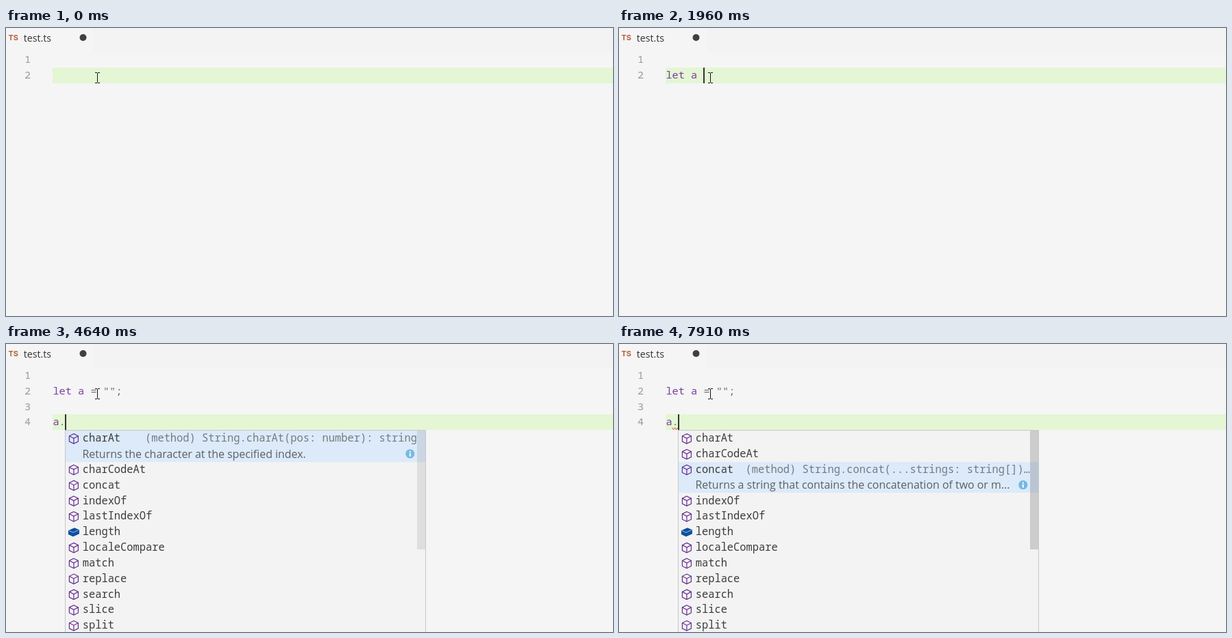
An HTML page with a canvas for the animation above (8 s loop, 886 px wide and 422 px high).

```html
<!DOCTYPE html>
<html lang="en">
<head>
<meta charset="utf-8">
<title>Editor completion</title>
<style>
  html, body { margin: 0; width: 100%; height: 100%; overflow: hidden; background: #f5f5f5; }
  canvas { display: block; }
</style>
</head>
<body>
<canvas id="stage" width="886" height="422"></canvas>
<script>
const ctx = document.getElementById('stage').getContext('2d');
const LOOP = 8000;
const MONO = '"Noto Sans Mono", "DejaVu Sans Mono", monospace';
const SANS = '"Open Sans", "Noto Sans", sans-serif';
const CODE_FONT = `15.3px ${MONO}`;
const LIST_SIZE = '15.4px';
const CODE_X = 68.4, CHAR_W = 9.18, ROW_H = 22.83;
const lineTop = n => Math.round(35.2 + (n - 1) * 22.75);

// [time, line, text on that line]
const edits = [
  [0, 2, ''], [1240, 2, 'l'], [1310, 2, 'le'], [1460, 2, 'let'], [1720, 2, 'let '],
  [1810, 2, 'let a'], [1960, 2, 'let a '], [2260, 2, 'let a ='], [2330, 2, 'let a = '],
  [2580, 2, 'let a = ""'], [3740, 2, 'let a = "";'], [3950, 3, ''], [4280, 4, ''],
  [4500, 4, 'a'], [4570, 4, 'a.']
];
const blinks = [470, 920, 1240, 3040, 3500, 4980, 5660, 6210, 6600, 7130, 7590];
const picks = [[4640, 0], [5580, 1], [6130, 2], [6530, 3], [7130, 2]];

const item = (icon, label) => ({ icon, label });
const requestTypes = [
  item('type', 'XMLHttpRequestEventTarget'), item('type', 'XMLHttpRequestEventTargetEventMap'),
  item('alias', 'XMLHttpRequestResponseType'), item('type', 'XMLHttpRequestUpload')
];
const lengthItem = item('field', 'length'), letItem = item('keyword', 'let');
const screenItem = item('field', 'screenLeft');
const globalsLe = [
  ...requestTypes, item('type', 'XMLSerializer'), item('type', 'XSLTProcessor'),
  item('method', 'addEventListener'), lengthItem, letItem, item('field', 'localStorage'),
  item('method', 'removeEventListener'), screenItem
];
const globalsLet = [
  ...['WebGLObject', 'WebGLRenderingContext', 'WebGLShaderPrecisionFormat', 'XMLDocument',
    'XMLHttpRequest'].map(name => item('type', name)),
  ...requestTypes, lengthItem, letItem, screenItem
];
const members = ['charAt', 'charCodeAt', 'concat', 'indexOf', 'lastIndexOf', 'length',
  'localeCompare', 'match', 'replace', 'search', 'slice', 'split']
  .map(name => item(name === 'length' ? 'field' : 'method', name));
const details = [
  ['(method) String.charAt(pos: number): string', 'Returns the character at the specified index.'],
  ['(method) String.charCodeAt(index: number…', 'Returns the Unicode value of the character at the specif...'],
  ['(method) String.concat(...strings: string[])…', 'Returns a string that contains the concatenation of two or m...'],
  ['(method) String.indexOf(searchString: strin…', 'Returns the position of the first occurrence of a substring.']
];

const latest = (steps, t) => steps.filter(step => step[0] <= t).pop();

function rect(x, y, w, h, color) {
  ctx.fillStyle = color;
  ctx.fillRect(x, y, w, h);
}

function text(str, x, y, color, font, align = 'left') {
  ctx.font = font;
  ctx.fillStyle = color;
  ctx.textAlign = align;
  ctx.fillText(str, x, y);
}

function disc(x, y, r, color) {
  ctx.fillStyle = color;
  ctx.beginPath();
  ctx.arc(x, y, r, 0, Math.PI * 2);
  ctx.fill();
}

function path(points, { stroke, fill, width = 1.2, close = false }) {
  ctx.beginPath();
  points.forEach(([x, y]) => ctx.lineTo(x, y));
  if (close) ctx.closePath();
  if (fill) { ctx.fillStyle = fill; ctx.fill(); }
  if (stroke) { ctx.strokeStyle = stroke; ctx.lineWidth = width; ctx.stroke(); }
}

// Icons are drawn around their own centre.
const icons = {
  type() {
    const blue = '#00539c';
    rect(-6, -0.8, 8, 1.6, blue);
    disc(-5.5, 0, 2.4, blue);
    disc(4, 0, 4, blue);
    disc(4, 0, 1.8, '#f3f3f3');
  },
  method() {
    const line = { stroke: '#652d90' };
    path([[0, -7.2], [6.5, -4], [6.5, 4], [0, 7.2], [-6.5, 4], [-6.5, -4]], { ...line, close: true });
    path([[-6.5, -4], [0, -0.6], [6.5, -4]], line);
    path([[0, -0.6], [0, 7.2]], line);
  },
  field() {
    path([[1, -6.5], [8, -3.5], [8, 2.5], [-1, 6.5], [-8, 3.2], [-8, -2.6]], { fill: '#0d51a0', close: true });
    path([[-7, -2.2], [-1, 0.4], [7, -3.1]], { stroke: '#c9d9ea', width: 0.8 });
  },
  alias() {
    const brown = '#8f7048';
    path([[-7.5, -3], [-3, -7], [1, -3], [-3.5, 1]], { fill: brown, close: true });
    path([[0, -2], [5, -2], [5, 1]], { stroke: brown });
    path([[-2, 0], [-2, 5], [2, 5]], { stroke: brown });
    path([[2, 1], [5, -1.5], [8, 1], [5, 3.5]], { fill: brown, close: true });
    path([[1, 5], [4, 2.5], [7, 5], [4, 7.5]], { fill: brown, close: true });
  },
  keyword() {
    [[-8, -6, 8], [2, -6, 5], [-8, -2, 4], [-2, -2, 9], [-8, 2, 9], [3, 2, 4], [-8, 6, 6], [0, 6, 7]]
      .forEach(([x, y, w]) => rect(x, y - 0.8, w, 1.6, '#686868'));
  }
};

// Positions of the letters that match the typed prefix, capitals first.
function matches(label, query) {
  const found = new Set();
  let from = 0;
  for (const ch of query) {
    let at = label.indexOf(ch.toUpperCase(), from);
    if (at < 0) at = label.indexOf(ch, from);
    if (at < 0) break;
    found.add(at);
    from = at + 1;
  }
  return found;
}

function drawLabel(label, x, y, query) {
  const hits = matches(label, query);
  ctx.font = `${LIST_SIZE} ${MONO}`;
  const step = ctx.measureText('0').width;
  [...label].forEach((ch, i) => hits.has(i)
    ? text(ch, x + i * step, y, '#0f66ab', `bold ${LIST_SIZE} ${MONO}`)
    : text(ch, x + i * step, y, '#3c3c3c', `${LIST_SIZE} ${MONO}`));
}

function drawPopup({ x, y, w, h, items, selected, detail, doc, query = '', thumb }) {
  rect(x, y, w, h, '#c8c8c8');
  rect(x + 1, y + 1, w - 2, h - 2, '#f3f3f3');
  let top = y + 1;
  items.forEach((entry, i) => {
    const active = i === selected;
    const height = active && doc ? ROW_H * 2 : ROW_H;
    if (active) {
      const begin = Math.round(top);
      rect(x + 1, begin, w - 2, Math.round(top + height) - begin, '#dceafa');
    }
    ctx.save();
    ctx.translate(x + 12.9, top + 11.8);
    icons[entry.icon]();
    ctx.restore();
    drawLabel(entry.label, x + 25.7, top + 16.2, query);
    if (active && detail) {
      text(detail, x + w - 13, top + 16.2, '#777b80', `${LIST_SIZE} ${MONO}`, 'right');
    }
    if (active && doc) {
      text(doc, x + 25.5, top + 39.5, '#5c6064', `15.92px ${SANS}`);
      const cx = x + w - 23.2, cy = top + 33.8;
      disc(cx, cy, 6.6, '#75b9e2');
      rect(cx - 1, cy - 4, 2, 2, '#fff');
      rect(cx - 1, cy - 1, 2, 5, '#fff');
    }
    top += height;
  });
  rect(x + w - 13, thumb.y, 12, thumb.h, `rgba(100, 100, 100, ${thumb.alpha})`);
}

function drawCompletion(t) {
  const globals = { y: 81, w: 528, h: 275, thumb: { y: 331, h: 24, alpha: 0.4 } };
  if (t >= 1390 && t < 1550) {
    drawPopup({ ...globals, x: 88, items: globalsLe, selected: 7, detail: 'var length: number', query: 'le' });
  } else if (t >= 1550 && t < 1720) {
    drawPopup({ ...globals, x: 95, items: globalsLet, selected: 10, query: 'let' });
  } else if (t >= 4640) {
    const selected = latest(picks, t)[1];
    const [detail, doc] = details[selected];
    const alpha = t < 4740 ? 0.15 : t < 7910 ? 0.4 : 0.28;
    drawPopup({ x: 86, y: 126, w: 527, h: 310, items: members, selected, detail, doc,
      thumb: { y: 127, h: 174, alpha } });
  }
}

function drawCode(t) {
  const [, current, typed] = latest(edits, t);
  rect(68, lineTop(current), 818, lineTop(current + 1) - lineTop(current), '#e4f6d4');
  for (let n = 1; n <= Math.max(2, current); n++) {
    text(n, 36.3, lineTop(n) + 16, '#999', CODE_FONT, 'right');
    const code = n === current ? typed : n === 2 ? 'let a = "";' : '';
    [...code].forEach((ch, i) =>
      text(ch, CODE_X + i * CHAR_W, lineTop(n) + 16, /[a-z]/.test(ch) ? '#7a3e9d' : '#6c6c6c', CODE_FONT));
  }
  if (t >= 5110) {
    const wave = Array.from({ length: 5 }, (_, i) => [77.5 + i * 2.1, i % 2 ? 125 : 123]);
    path(wave, { stroke: '#e51400', width: 1 });
  }
  if (blinks.filter(b => b <= t).length % 2) {
    const column = typed.length - (t >= 2580 && t < 3500 ? 1 : 0);
    rect(Math.floor(CODE_X + column * CHAR_W), lineTop(current), 2, lineTop(current + 1) - lineTop(current), '#333');
  }
}

function drawTabs() {
  rect(128, 0, 758, 36, '#f3f3f3');
  text('TS', 3.5, 18, '#b7603f', 'bold 11px Inter, Roboto, sans-serif');
  text('test.ts', 25.7, 20, '#333', `14.2px ${SANS}`);
  disc(112.5, 14, 5, '#404040');
}

function drawPointer() {
  rect(133, 66, 1, 14, '#111');
  for (const y of [65, 80]) {
    rect(130, y, 3, 1, '#111');
    rect(134, y, 3, 1, '#111');
  }
}

function frame(now) {
  const t = now % LOOP;
  rect(0, 0, 886, 422, '#f5f5f5');
  drawTabs();
  drawCode(t);
  drawCompletion(t);
  drawPointer();
  requestAnimationFrame(frame);
}

requestAnimationFrame(frame);
</script>
</body>
</html>
```
